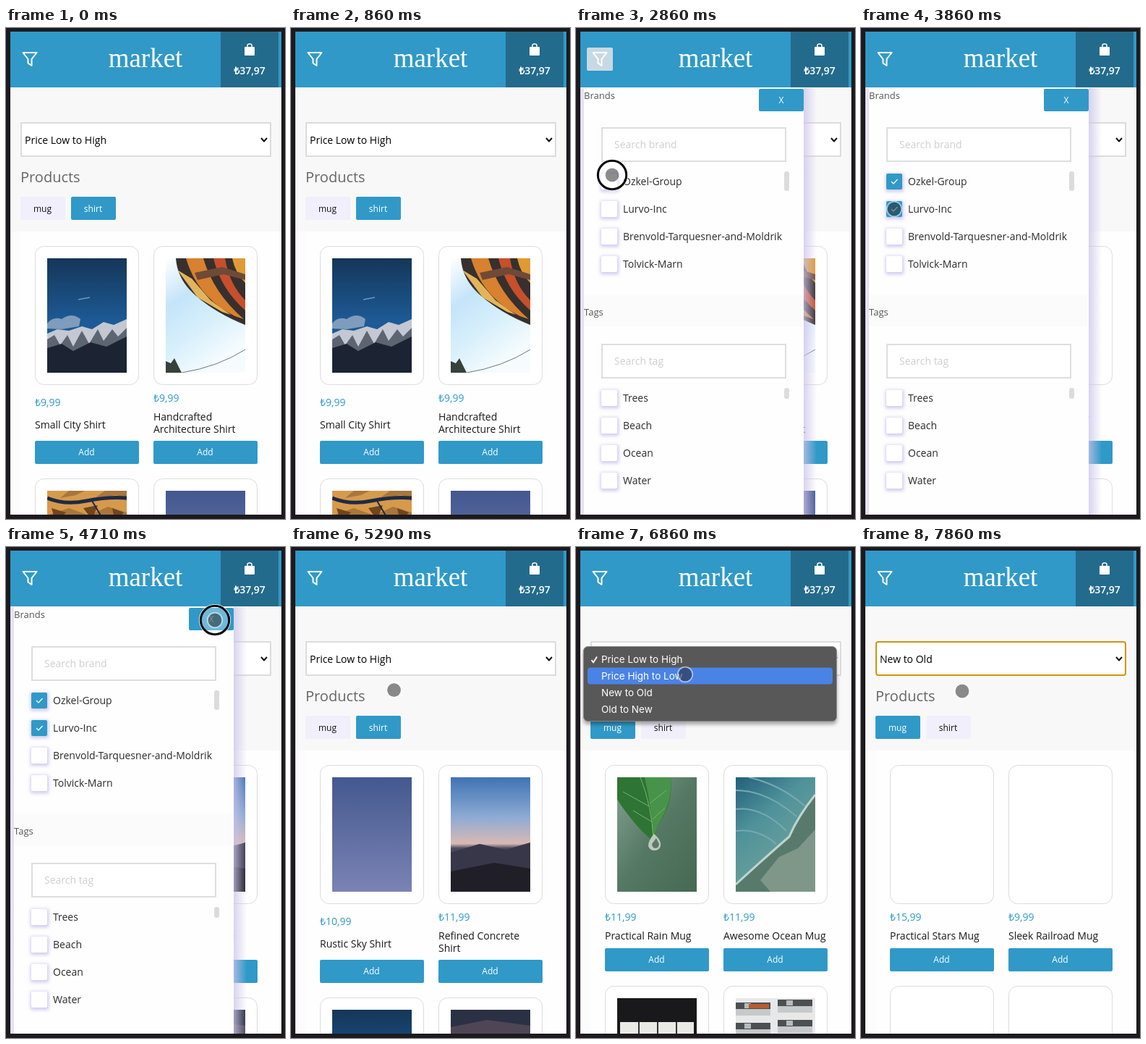
An HTML page for the animation above (8 s loop, 386x678 px).

```html
<!DOCTYPE html>
<html lang="en">
<head>
<meta charset="utf-8">
<title>Shop filters</title>
<style>
  html, body { margin: 0; width: 100%; height: 100%; overflow: hidden; background: #1c1a1e; }
  svg { display: block; font-family: "Open Sans", sans-serif; }
  #stage { width: 386px; height: 678px; }
</style>
</head>
<body>
<svg id="stage" viewBox="0 0 386 678">
  <defs>
    <linearGradient id="night" x2="0" y2="1"><stop stop-color="#153658"/><stop offset=".55" stop-color="#1d5a96"/></linearGradient>
    <linearGradient id="day" x2=".5" y2="1"><stop stop-color="#fff"/><stop offset=".35" stop-color="#c5e4fa"/><stop offset=".65" stop-color="#d6effb"/><stop offset="1" stop-color="#f6fcfe"/></linearGradient>
    <linearGradient id="dusk" x2="0" y2="1"><stop stop-color="#44588f"/><stop offset="1" stop-color="#7b83b4"/></linearGradient>
    <linearGradient id="sunset" x2="0" y2="1"><stop stop-color="#3f73b5"/><stop offset=".35" stop-color="#8eabd3"/><stop offset=".58" stop-color="#d8b9b4"/><stop offset=".62" stop-color="#4b4a5c"/><stop offset="1" stop-color="#1d1c22"/></linearGradient>
    <linearGradient id="garden" x2="1" y2="1"><stop stop-color="#85a291"/><stop offset=".5" stop-color="#547863"/><stop offset="1" stop-color="#466952"/></linearGradient>
    <linearGradient id="sea" x2=".6" y2="1"><stop stop-color="#235f7c"/><stop offset=".4" stop-color="#4f929a"/><stop offset="1" stop-color="#77a69c"/></linearGradient>
    <linearGradient id="shade"><stop stop-color="#ccc4ea" stop-opacity=".75"/><stop offset="1" stop-color="#ccc4ea" stop-opacity="0"/></linearGradient>
    <filter id="soft" x="-40%" y="-40%" width="180%" height="180%"><feGaussianBlur stdDeviation="2.5"/></filter>
    <clipPath id="page"><path d="M6 5H381V672H6Z"/></clipPath>
  </defs>
  <g id="scene" clip-path="url(#page)"></g>
</svg>
<script>
const LOOP = 8000, STEPS = 56;
const BLUE = '#3099c7';

const rect = (x, y, w, h, fill, extra = '') =>
  `<rect x="${x}" y="${y}" width="${w}" height="${h}" fill="${fill}" ${extra}/>`;
const path = (d, fill, extra = '') => `<path d="${d}" fill="${fill}" ${extra}/>`;
const line = (d, color, width = 2) =>
  path(d, 'none', `stroke="${color}" stroke-width="${width}" stroke-linejoin="round"`);
const text = (x, y, str, size, fill, extra = '') =>
  `<text x="${x}" y="${y}" font-size="${size}" fill="${fill}" ${extra}>${str}</text>`;
const centred = (x, y, str, size, fill, extra = '') =>
  text(x, y, str, size, fill, `text-anchor="middle" ${extra}`);
const outline = (x, y, w, h, color, extra = '') =>
  rect(x + 1, y + 1, w - 2, h - 2, '#fff', `stroke="${color}" stroke-width="2" ${extra}`);

// Pictures are drawn in a 110 x 158 box.
const backdrop = fill => rect(0, 0, 110, 158, fill);
const photos = {
  mountain: backdrop('url(#night)') +
    path('M0 90Q8 80 20 84Q34 74 46 84L44 94L20 98L0 97Z', '#7f9cbd') +
    line('M43 57L59 54', '#7395bb', 1.5) +
    path('M0 104L14 98L30 100L48 94L62 98L78 88L92 92L110 84V158H0Z', '#c3c8d2') +
    path('M0 112L10 106L18 120L28 106L36 122L48 100L58 118L70 98L78 114L90 98L98 108L110 96V158H0Z', '#5d6472') +
    path('M0 124L20 118L36 128L60 116L82 122L110 108V158H0Z', '#1c2433'),
  balloon: backdrop('url(#day)') +
    path('M14 0H110V92Q70 76 42 52Q16 30 14 0Z', '#37302e') +
    path('M28 0H52Q66 48 108 84L96 80Q44 54 28 0Z', '#d8812f') +
    path('M66 0H82Q88 36 110 58V72Q76 42 66 0Z', '#c74f2b') +
    path('M92 0H110V34Q96 20 92 0Z', '#e09a35') +
    path('M16 16L36 28L62 58L90 78L78 74L44 54Z', '#e2b55c') +
    path('M40 20L78 12L110 22V30L80 22L44 30Z', '#6f4a37') +
    line('M22 158Q72 150 110 126', '#70777c', 1) +
    path('M0 158V142L7 145L12 138L17 148L22 158Z', '#36413b'),
  autumn: backdrop('#a9763c') +
    path('M0 0H30L18 10L40 6L52 0H80L66 10L96 6L110 14V30L84 22L58 34L30 24L0 34Z', '#d69a4c') +
    path('M6 24L26 30L12 44ZM50 24L70 20L62 40ZM90 24L106 30L94 44Z', '#70451f') +
    line('M0 10Q24 20 54 14T110 10', '#1e2a45', 5) + line('M62 14L74 34', '#1e2a45', 2),
  dusk: backdrop('url(#dusk)'),
  sunset: backdrop('url(#sunset)') + path('M0 104L40 92L76 100L110 90V158H0Z', '#38374a') +
    path('M0 130L60 118L110 126V158H0Z', '#201f28'),
  dark: backdrop('#2b3144') + path('M0 24L50 14L110 22V158H0Z', '#4f4655'),
  leaf: backdrop('url(#garden)') +
    path('M0 0H74Q78 38 56 66L50 88Q34 76 20 58Q4 38 0 30Z', '#2e7434') +
    path('M38 0H74Q77 36 56 66L50 86Q48 44 38 0Z', '#48934a') +
    line('M32 0Q48 40 50 86M45 36L68 18M49 58L66 42M44 40L8 20M49 62L22 46', '#79b26c', 1) +
    path('M51 78Q62 88 60 95A9 9 0 0 1 43 95Q43 87 51 78Z', '#bccabf') +
    path('M48 92A5 6 0 0 0 58 92L54 84Z', '#607966'),
  ocean: backdrop('url(#sea)') +
    path('M110 24Q86 54 74 82Q46 106 0 148V158H110Z', '#587a6c') +
    path('M110 72L86 98L60 110L34 142L48 158H110Z', '#7e9788') +
    line('M110 24Q86 54 74 82Q46 106 0 148', '#bcd5cf', 3) +
    line('M0 18Q42 18 84 54M0 44Q36 40 70 74M0 74Q30 70 56 92M18 0Q62 10 96 40', '#76aab0', 2),
  windows: backdrop('#19191b') + rect(4, 33, 102, 125, '#e9e9e6') +
    line('M30 33V158M56 33V158M82 33V158', '#333', 2),
  balconies: backdrop('#e7e8e8') +
    [[0, 6], [58, 2], [0, 34], [58, 30]].map(([x, y]) =>
      rect(x, y, 48, 9, '#4d5052') + rect(x, y + 9, 48, 9, '#c6c9ca') + rect(x + 12, y + 1, 9, 7, '#b4bbbd')).join('') +
    rect(18, 8, 28, 6, '#b75b31')
};

const catalogs = {
  shirts: { tall: true, items: [['₺9,99', ['Small City Shirt'], 'mountain', 'autumn'],
    ['₺9,99', ['Handcrafted', 'Architecture Shirt'], 'balloon', 'dusk']] },
  branded: { tall: true, items: [['₺10,99', ['Rustic Sky Shirt'], 'dusk', 'mountain'],
    ['₺11,99', ['Refined Concrete', 'Shirt'], 'sunset', 'dark']] },
  mugs: { items: [['₺11,99', ['Practical Rain Mug'], 'leaf', 'windows'],
    ['₺11,99', ['Awesome Ocean Mug'], 'ocean', 'balconies']] },
  newest: { items: [['₺15,99', ['Practical Stars Mug']], ['₺9,99', ['Sleek Railroad Mug']]] }
};

function card(x, y, photo) {
  const picture = photo
    ? `<svg x="${x + 17}" y="${y + 17}" width="110" height="158">${photos[photo]}</svg>` : '';
  return rect(x + .5, y + .5, 143, 191, '#fff', 'rx="12" stroke="#dcdcdc"') + picture;
}

function products({ tall, items }, loaded) {
  const buttonY = tall ? 570 : 554;
  return items.map(([price, name, top, bottom], i) => {
    const x = i ? 204 : 40, drop = tall && name.length === 1 ? 6 : 0;
    return card(x, 301, loaded && top) +
      text(x, 516 + drop, price, 14, BLUE) +
      name.map((part, n) => text(x, 542 + (drop && 11) + n * 17, part, 14, '#191919')).join('') +
      rect(x, buttonY, 144, 32, BLUE, 'rx="2"') + centred(x + 71.5, buttonY + 20, 'Add', 12, '#fff') +
      card(x, buttonY + 52, loaded && bottom);
  }).join('');
}

function header(focused) {
  return rect(6, 5, 375, 77, BLUE) + rect(297, 5, 80, 77, '#236b8c') +
    (focused ? rect(15, 27, 36, 32, '#c9d9e3', 'rx="2"') : '') +
    line('M23.5 34H42.5L35.5 43V52L30.5 48.5V43Z', '#fff') +
    centred(193, 54, 'market', 37, '#fff', 'font-family="Liberation Serif, serif"') +
    rect(330, 26, 14, 12, '#fff', 'rx="1"') + line('M334 27V24Q334 22 337 22T340 24V27', '#fff', 1.5) +
    centred(337, 64, '₺37,97', 14, '#fff', 'font-weight="600"');
}

function tab(x, label, active, hover) {
  return rect(x, 233, 62, 32, active ? (hover ? '#387fa2' : BLUE) : '#f1effb', 'rx="2"') +
    centred(x + 30.5, 254, label, 12, active ? '#fff' : '#111');
}

function checkbox(y, label, checked) {
  return rect(34, y - 11, 25, 25, '#cfc8ee', 'filter="url(#soft)"') +
    rect(35, y - 11, 22, 22, checked ? BLUE : '#fff', 'rx="2"') +
    (checked ? line(`M42 ${y}L45 ${y + 3}L50.5 ${y - 3}`, '#fff', 1.3) : '') +
    text(65, y + 5, label, 14, '#2b2b2b');
}

function filterGroup(y, title, hint, labels, checked, thumb) {
  return text(11, y, title, 13, '#555') +
    outline(35, y + 39, 256, 48, '#dedede') + text(53, y + 68, hint, 14, '#cfcfcf') +
    labels.map((label, i) => checkbox(y + 114 + i * 38, label, i < checked)).join('') +
    rect(288, y + 100, 7, thumb, '#dcdcdc', 'rx="3"');
}

function drawer(checked) {
  return rect(315, 83, 18, 589, 'url(#shade)') + rect(6, 83, 5, 589, '#e6e1f7') +
    rect(11, 83, 304, 589, '#fefefe') + rect(11, 368, 304, 44, '#fbfbfc') +
    rect(253, 84, 62, 31, BLUE, 'rx="2"') + centred(284, 104, 'X', 12, '#fff') +
    filterGroup(98, 'Brands', 'Search brand',
      ['Ozkel-Group', 'Lurvo-Inc', 'Brenvold-Tarquesner-and-Moldrik', 'Tolvick-Marn'], checked, 27) +
    filterGroup(397, 'Tags', 'Search tag', ['Trees', 'Beach', 'Ocean', 'Water'], 0, 15);
}

function menu(cursorY) {
  const current = Math.max(0, Math.min(3, Math.round((cursorY - 155) / 23)));
  const labels = ['Price Low to High', 'Price High to Low', 'New to Old', 'Old to New'];
  return rect(10, 141, 351, 104, '#0005', 'rx="6" filter="url(#soft)"') +
    rect(10.5, 137.5, 350, 103, '#585858', 'rx="6" stroke="#858585"') +
    rect(16, 143.5 + current * 23, 339, 23, '#4a83e6', 'rx="4"') +
    line('M21.5 156L24 159.5L29 151.5', '#fff', 1.8) +
    labels.map((label, i) => text(35, 160 + i * 23, label, 13.5, '#fff',
      'font-family="Inter, sans-serif"')).join('');
}

// Pointer stops: step, x, y. Clicks list the steps during which the ring shows.
const stops = [[5, -15, 160], [11, 36, 38], [15, 36, 38], [19, 50, 203], [21, 50, 203], [24, 46, 250],
  [27, 46, 250], [32, 289, 101], [34, 289, 101], [39, 63, 250], [42, 63, 250], [45, 151, 154],
  [46, 151, 154], [48, 151, 176], [51, 140, 199], [56, 140, 199]];
const clicks = [13, 14, 20, 25, 33, 40, 45, 52];

function pointerAt(step) {
  const next = stops.findIndex(stop => stop[0] > step);
  if (next < 1) return { x: -15, y: 160 };
  const [t0, x0, y0] = stops[next - 1], [t1, x1, y1] = stops[next];
  const u = (step - t0) / (t1 - t0), ease = u * u * (3 - 2 * u);
  return { x: x0 + (x1 - x0) * ease, y: y0 + (y1 - y0) * ease };
}

function pointer({ x, y }, pressed) {
  const ring = (r, extra) => `<circle cx="${x}" cy="${y}" r="${r}" ${extra}/>`;
  return (pressed ? ring(21, 'fill="#fff" fill-opacity=".3" stroke="#fff" stroke-width="2"') +
      ring(19.7, 'fill="none" stroke="#050505" stroke-width="3"') : '') +
    ring(9.5, 'fill="#222" fill-opacity=".52"') +
    ring(10.3, 'fill="none" stroke="#fff" stroke-opacity=".5" stroke-width="1.8"');
}

function scene(step) {
  const within = (from, to) => step >= from && step < to;
  const cursor = pointerAt(step);
  const mugs = step >= 41, sorted = step >= 53;
  const catalog = sorted ? 'newest' : mugs ? 'mugs' : step >= 26 ? 'branded' : 'shirts';
  const loaded = !within(26, 28) && !within(41, 44) && !sorted;
  const checked = step >= 26 ? 2 : step >= 21 ? 1 : 0;
  return rect(6, 5, 375, 667, '#f8f8f8') + rect(6, 281, 375, 391, '#fcfcfc') +
    rect(20, 281, 361, 391, '#fefefe') +
    outline(20, 130, 347, 48, sorted ? '#d8910f' : '#dcdcdc', sorted ? 'rx="3"' : '') +
    text(26, 160, sorted ? 'New to Old' : 'Price Low to High', 14, '#000') +
    line('M353 152L357 156.5L361 152', '#111') +
    text(20, 213, 'Products', 20, '#666') +
    tab(20, 'mug', mugs, within(39, 43)) + tab(90, 'shirt', !mugs) +
    products(catalogs[catalog], loaded) +
    header(within(15, 21)) +
    (within(15, 34) ? drawer(checked) : '') +
    (within(46, 53) ? menu(cursor.y) : '') +
    pointer(cursor, clicks.includes(step));
}

const target = document.getElementById('scene');
let shown = -1;
function tick(now) {
  const step = Math.floor((now % LOOP) / LOOP * STEPS + .05) % STEPS;
  if (step !== shown) target.innerHTML = scene(shown = step);
  requestAnimationFrame(tick);
}
tick(performance.now());
</script>
</body>
</html>
```
